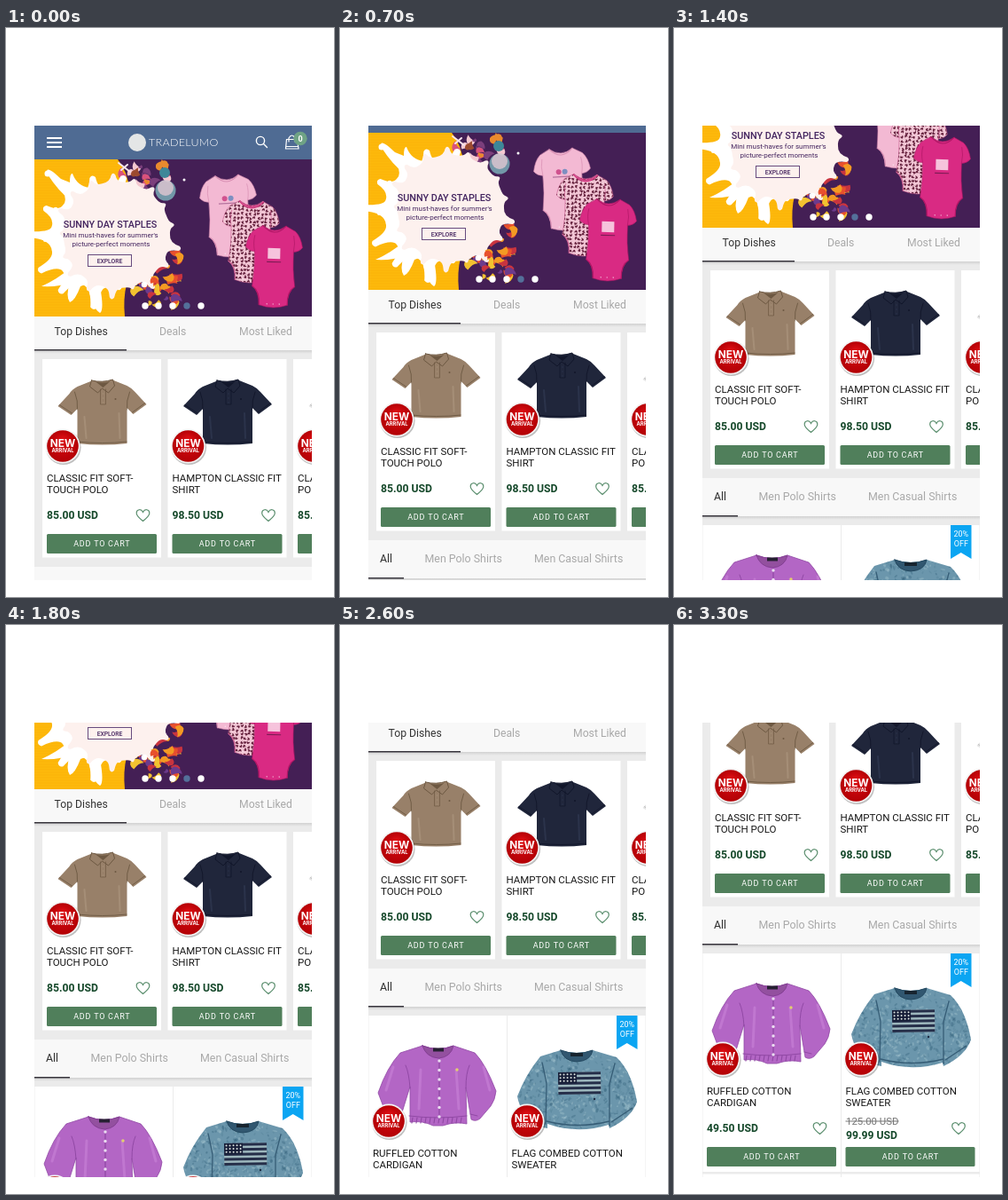
An HTML page with a canvas for the animation above (3.8 s loop, 370x641 px).

```html
<!DOCTYPE html>
<html lang="en">
<head>
<meta charset="utf-8">
<title>Shop app scroll</title>
<style>
html, body { margin: 0; width: 100%; height: 100%; overflow: hidden; background: #fff; }
canvas { display: block; width: 370px; height: 641px; }
</style>
</head>
<body>
<canvas id="stage"></canvas>
<script>
const W = 370, H = 641, LOOP = 3800;
const VIEW = { x: 32, y: 110, w: 313, h: 512 };
const PAGE_H = 920;
const dpr = window.devicePixelRatio || 1;
const SANS = 'Roboto, sans-serif';

function setup(cv, h) {
  cv.width = Math.round(W * dpr);
  cv.height = Math.round(h * dpr);
  const ctx = cv.getContext('2d');
  ctx.scale(dpr, dpr);
  return ctx;
}
const stage = document.getElementById('stage');
const out = setup(stage, H);
const page = document.createElement('canvas');
const c = setup(page, PAGE_H);

let seed = 7;
function rnd(a = 0, b = 1) {
  seed = (seed * 16807) % 2147483647;
  return a + (b - a) * seed / 2147483647;
}

// ---- drawing helpers ----
function rect(x, y, w, h, col) { c.fillStyle = col; c.fillRect(x, y, w, h); }
function round(x, y, w, h, r, col) {
  c.fillStyle = col; c.beginPath(); c.roundRect(x, y, w, h, r); c.fill();
}
function dot(x, y, r, col) {
  c.fillStyle = col; c.beginPath(); c.arc(x, y, r, 0, 7); c.fill();
}
function shape(d, fill, stroke, lw = 1) {
  const p = new Path2D(d);
  if (fill) { c.fillStyle = fill; c.fill(p); }
  if (stroke) { c.strokeStyle = stroke; c.lineWidth = lw; c.stroke(p); }
  return p;
}
// y is the middle of the capital letters
function text(s, x, y, size, col, { w = 400, align = 'left', sp = 0, font = SANS } = {}) {
  c.font = `${w} ${size}px ${font}`;
  c.letterSpacing = sp + 'px';
  c.textAlign = align;
  c.fillStyle = col;
  c.fillText(s, x, y + size * 0.355);
  c.letterSpacing = '0px';
}
function at(x, y, fn, rot = 0, sc = 1) {
  c.save(); c.translate(x, y); c.rotate(rot); c.scale(sc, sc); fn(); c.restore();
}
function shade(y) {
  const g = c.createLinearGradient(0, y, 0, y + 4);
  g.addColorStop(0, 'rgba(0,0,0,.11)');
  g.addColorStop(1, 'rgba(0,0,0,0)');
  rect(32, y, 313, 4, g);
}

// ---- header ----
function header() {
  rect(32, 110, 313, 38, '#4f6b93');
  for (const y of [123, 128, 133]) rect(46, y, 17, 2, '#fff');
  dot(148, 129, 10, '#e4e6e6');
  text('TRADELUMO', 161, 129, 12.5, '#fff', { w: 300, font: 'Lato, sans-serif', sp: 0.3 });
  c.strokeStyle = '#fff'; c.lineWidth = 1.4; c.lineCap = 'round';
  c.beginPath(); c.arc(287, 127, 4.6, 0, 7);
  c.moveTo(290.5, 130.5); c.lineTo(294.5, 134.5); c.stroke();
  shape('M316.5 125.5H328.500L330 136H315.500Z M316 133.500H329.500', null, '#fff', 1.2);
  shape('M319 128V124Q322.500 118 326 124V128', null, '#fff', 1.2);
  dot(332, 124.500, 7.700, '#6fa385');
  text('0', 332, 124.500, 9, '#fff', { w: 700, align: 'center' });
}

// ---- banner ----
function splat(x, y, r, n, spike, col) {
  c.fillStyle = col; c.beginPath();
  const pt = (a, q) => [x + Math.cos(a) * q, y + Math.sin(a) * q];
  const step = Math.PI * 2 / n;
  c.moveTo(...pt(0, r));
  for (let i = 0; i < n; i++) {
    const a = (i + rnd(-0.12, 0.12)) * step, q = r + rnd(0.1, 1) * spike;
    c.quadraticCurveTo(...pt(a + step * 0.32, r), ...pt(a + step * 0.4, q));
    c.quadraticCurveTo(...pt(a + step * 0.5, q + 4), ...pt(a + step * 0.6, q));
    c.quadraticCurveTo(...pt(a + step * 0.66, r), ...pt((i + 1) * step, r));
  }
  c.fill();
}
function confetti(n, x0, x1, y0, y1, cols, big = 6) {
  for (let i = 0; i < n; i++) {
    const s = rnd(2, big), col = cols[i % cols.length];
    at(rnd(x0, x1), rnd(y0, y1), () =>
      shape('M0 -1Q1.300 -.8 1 .3Q.2 1.200 -1 .7Q-.2 .3 0 -1Z', col), rnd(0, 6), s);
  }
}

const SUIT = 'M-13 1Q0 11 13 1L24 7Q30 13 32 25Q28 30 22 30Q21 50 24 69Q16 75 16 90Q0 96 -16 90' +
  'Q-16 75 -24 69Q-21 50 -22 30Q-28 30 -32 25Q-30 13 -24 7Z';
function suit(x, y, rot, col, edge, detail) {
  at(x, y, () => {
    const p = shape(SUIT, col, edge, 0.6);
    c.save(); c.clip(p); detail(); c.restore();
    shape('M-13 1Q0 15 13 1M-24 69Q-15 75 -16 90M24 69Q15 75 16 90', null, edge, 1.1);
    shape('M-22 30Q-24 20 -22 12M22 30Q24 20 22 12', null, edge, 0.7);
    for (const b of [-7, 0, 7]) dot(b, 89, 0.8, '#fff8');
  }, rot);
}

function banner() {
  c.save();
  c.beginPath(); c.rect(32, 148, 313, 177); c.clip();
  rect(32, 148, 313, 177, '#fdb90b');
  c.strokeStyle = 'rgba(240,150,0,.25)'; c.lineWidth = 0.7;
  for (let y = 150; y < 326; y += 3) {
    c.beginPath(); c.moveTo(32, y); c.lineTo(150, y); c.stroke();
  }
  shape('M126 148Q137 161 140 185L150 260Q130 285 134 325H345V148Z', '#441f55');
  confetti(22, 128, 186, 151, 186, ['#e98a2e', '#7b3f7c', '#d9527c', '#f4c8d0', '#9c4a2f']);
  confetti(40, 146, 196, 250, 311, ['#e8502d', '#f39a23', '#c9343f', '#6c3b8c', '#f2c230'], 7);
  dot(179, 163, 6, '#3e8798');
  dot(180, 183, 11.5, 'rgba(126,181,189,.8)');
  dot(180, 180, 9, 'rgba(240,205,215,.7)');
  shape('M127 152L140 162M130 160L137 154', null, '#f7e6ee', 2);
  // drips over the yellow side
  splat(106, 237, 56, 13, 24, '#fff');
  shape('M62 170Q43 152 47 165Q60 185 72 193L79 211L94 180Q80 178 75 164Q72 163 72 174Z', '#fff');
  shape('M73 270Q58 283 40 291Q60 292 72 287Q67 302 72 309Q78 307 84 291L92 288Q97 316 106 321Q111 318 106 291Z', '#fff');
  splat(125, 233, 60, 17, 12, '#fdf1ee');
  dot(47, 164, 3.5, '#fff');
  dot(44, 239, 2, '#fff');
  dot(56, 204, 2.3, '#fff');
  confetti(9, 164, 192, 275, 307, ['#e8502d', '#f39a23', '#c9343f']);
  dot(156, 289, 3.3, '#fff');
  dot(201, 171, 1.5, '#fff');

  const ink = '#43245f';
  text('SUNNY DAY STAPLES', 117.5, 221.5, 10.8, ink, { w: 500, align: 'center' });
  text("Mini must-haves for summer's", 118, 233.5, 8, ink, { align: 'center' });
  text('picture-perfect moments', 118.500, 243.500, 8, ink, { align: 'center' });
  c.strokeStyle = '#674b7e'; c.lineWidth = 1;
  c.strokeRect(92.5, 255.5, 49, 13);
  text('EXPLORE', 117, 262.3, 6.8, ink, { w: 500, align: 'center' });

  suit(249, 165, -0.06, '#f3b9d3', '#d98fb3', () => {
    dot(-4, 27, 3, '#d0538f'); dot(3, 27, 3, '#7d8fc1');
    rect(-11, 32, 22, 1.2, '#b5739e');
  });
  suit(277, 194, 0.03, '#f2c6d5', '#cc5f92', () => {
    for (let y = 2; y < 95; y += 4.5)
      for (let x = -32; x < 33; x += 4.5)
        at(x + rnd(-1, 1), y + rnd(-1, 1), () =>
          shape('M-1.800 -1Q0 -2.500 2 0Q1 2 -1 1.700Q.5 0 -1.800 -1Z', '#67233f'), rnd(0, 6));
    shape('M-13 1Q0 15 13 1', null, '#d52a7a', 3);
  });
  suit(303, 222, 0.02, '#d92a83', '#b01765', () => {
    rect(-7, 26, 14, 12, '#f6c3dc');
    rect(-8, 41, 16, 1.2, '#7e1c55');
  });
  [157, 172, 188, 204, 220].forEach((x, i) => dot(x, 313, 3.7, i === 3 ? '#54709a' : '#fff'));
  c.restore();
}

// ---- product pieces ----
function polo(x, y, col, dark, light) {
  at(x, y, () => {
    const p = shape('M-13 2L-28 8Q-34 11 -37 16L-50 30L-35 40L-28 33L-28 72Q0 75 28 72L28 32L35 39L50 28' +
      'L37 14Q34 10 28 7L13 1Q0 5 -13 2Z', col);
    c.save(); c.clip(p);
    shape('M-28 34Q-27 24 -31 14M28 34Q27 24 31 14M-49 28L-34 38M49 26L34 37M-28 70Q0 73 28 70', null, dark, 0.9);
    shape('M-20 42L-18 66M19 38L20 66', null, light, 2);
    c.restore();
    shape('M-12 1L-14 8L-5 15L0 10L7 15L14 7L12 0Q0 4 -12 1Z', col, dark, 1);
    shape('M-8 2Q0 5 9 2L1 9Z', dark);
    shape('M-2 11L-2 28L4 28L4 11', null, dark, 0.7);
    for (const b of [16, 21, 26]) dot(1, b, 0.8, light);
    dot(15, 22, 1, dark);
  });
}

function cardigan() {
  const edge = '#9149a5';
  shape('M93 694L68 702Q53 718 43 747L54 776L66 782L79 740L79 780Q93 778 105 784L116 784Q130 779 143 782' +
    'L142 741L148 777Q153 780 158 776L170 762Q175 755 176 745Q164 714 152 702L128 694Q111 701 93 694Z', '#b366c5', edge, 0.8);
  shape('M79 742Q78 725 74 716M142 741Q142 725 146 716M78 773Q111 777 143 773M55 766L67 776M147 771L155 773', null, edge, 1);
  for (let x = 82; x < 142; x += 5) shape(`M${x} 775L${x - 1} 781`, null, edge, 1.2);
  shape('M60 718L52 744M162 718L169 744M91 721L89 765M131 721L134 765', null, 'rgba(220,160,232,.3)', 3);
  shape('M93 694Q111 701 128 694Q125 707 111 708Q97 707 93 694Z', '#93509f', '#843f94', 1);
  round(105, 696.500, 12, 4, 0, '#262032');
  shape('M112 708V776', null, edge, 1.3);
  for (let y = 711; y < 778; y += 10.5) dot(112, y, 1.7, '#eadcf0');
  dot(132, 721, 1.700, '#e3cf6d');
}

function sweater() {
  const p = shape('M249 699L226 706Q209 727 200 751Q204 773 224 785L234 787L234 782Q268 794 303 783L304 787' +
    'Q329 775 335 757Q329 723 312 707L285 699Q267 705 249 699Z', '#6b96ac');
  c.save(); c.clip(p);
  for (let i = 0; i < 700; i++) {
    const col = ['rgba(40,88,114,.3)', 'rgba(178,208,216,.3)', 'rgba(86,131,153,.4)'][i % 3];
    at(rnd(198, 337), rnd(697, 791), () => {
      c.fillStyle = col; c.beginPath(); c.ellipse(0, 0, rnd(0.8, 3), rnd(0.6, 1.8), 0, 0, 7); c.fill();
    }, rnd(0, 3));
  }
  shape('M232 782L233 737Q230 721 228 713M304 784L304 737Q308 722 310 714M233 779Q268 788 304 779M208 768L229 780M306 780L330 764',
    null, '#365d76', 1.3);
  c.restore();
  shape('M249 699Q267 706 285 699Q283 711 267 712Q252 711 249 699Z', '#315770', '#244960', 1);
  round(260, 702, 14, 4, 0, '#17242f');
  at(246, 724, () => {
    rect(0, 0, 48, 25, '#9db7bd');
    for (let y = 0; y < 25; y += 5.5) rect(0, y, 48, 3, '#252e49');
    rect(0, 0, 21, 12.500, '#171e38');
    for (let i = 0; i < 15; i++) dot(2.500 + (i % 5) * 4, 2.500 + Math.floor(i / 5) * 3.700, 1, '#dce3e0');
  }, -0.015);
  dot(287, 754, 1.2, '#1d2b42');
}

function badge(x, y) {
  dot(x + 0.8, y + 1.300, 19.8, 'rgba(0,0,0,.25)');
  dot(x, y, 19.5, '#f4f4f4');
  const g = c.createRadialGradient(x, y - 8, 2, x, y, 18);
  g.addColorStop(0, '#d80d12');
  g.addColorStop(1, '#b30005');
  dot(x, y, 17.8, g);
  const font = 'Inter, sans-serif';
  text('NEW', x, y - 3, 11.8, '#fff', { w: 700, align: 'center', font });
  text('ARRIVAL', x, y + 5, 5.8, '#fff', { w: 700, align: 'center', font });
}
function heart(x, y) {
  at(x, y, () => shape('M0 6.500C-4 3 -7.300 .5 -7.300 -2.600C-7.300 -6.800 -2 -7.800 0 -3.600' +
    'C2 -7.800 7.300 -6.800 7.300 -2.600C7.300 .5 4 3 0 6.500Z', null, '#5d9070', 1.2));
}
function button(x, y, w) {
  round(x, y, w, 22, 1.5, '#507f5b');
  text('ADD TO CART', x + w / 2 + 0.3, y + 11, 9, '#fff', { align: 'center', sp: 0.75 });
}
function title(lines, x, y) {
  lines.forEach((s, i) => text(s, x, y + i * 13, 11.5, '#161616'));
}
function price(s, x, y) { text(s, x, y, 12.2, '#15482a', { w: 700 }); }

function tabs(y, h, items, lineW) {
  rect(32, y, 313, h, '#f8f8f8');
  shade(y + h);
  rect(32, y + h - 1, lineW, 1.500, '#37343c');
  items.forEach(([s, x, size], i) => text(s, x, y + (h < 40 ? 17 : 21), size, i ? '#a8a8a8' : '#333'));
}

function topCard(i, lines, cost, cols) {
  const x = 41 + i * 141.5;
  rect(x, 373, 134, 223.5, '#fff');
  polo(x + 67.5, 396, ...cols);
  badge(x + 23, 471);
  title(lines, x + 5, 507);
  price(cost, x + 5, 548.5);
  heart(x + 113.5, 549);
  button(x + 5, 570, 124);
}
function lowCard(x, lines) {
  rect(x, 660, 155.500, 246, '#fff');
  title(lines, x + 4.5, 815);
  heart(x + 132, 857);
  button(x + 4.5, 878, 146);
}

function drawPage() {
  c.save();
  c.beginPath(); c.rect(32, 110, 313, PAGE_H - 110); c.clip();
  rect(32, 110, 313, PAGE_H, '#ebebeb');
  header();
  banner();
  tabs(325, 38, [['Top Dishes', 54.500, 12.2], ['Deals', 173, 12.2], ['Most Liked', 263, 12.2]], 104);
  topCard(0, ['CLASSIC FIT SOFT-', 'TOUCH POLO'], '85.00 USD', ['#988069', '#6d5842', '#a58e77']);
  topCard(1, ['HAMPTON CLASSIC FIT', 'SHIRT'], '98.50 USD', ['#20263b', '#11162a', '#2b334b']);
  topCard(2, ['CLASSIC FIT', 'POLO'], '85.00 USD', ['#e4e4e4', '#bcbcbc', '#f0f0f0']);
  tabs(607, 43, [['All', 45, 12.4], ['Men Polo Shirts', 95.500, 12.4], ['Men Casual Shirts', 219, 12.4]], 40);

  lowCard(32.500, ['RUFFLED COTTON', 'CARDIGAN']);
  cardigan();
  badge(55, 779);
  price('49.50 USD', 37, 857);

  lowCard(189, ['FLAG COMBED COTTON', 'SWEATER']);
  sweater();
  badge(211, 779);
  text('125.00 USD', 194, 848.5, 11.4, '#777');
  rect(193.5, 848.5, 60, 1, '#777');
  price('99.99 USD', 194, 865);
  shape('M312 660H335.500V698L323.700 691L312 698Z', '#0ba5f2');
  text('20%', 323.800, 669.500, 9, '#fff', { align: 'center' });
  text('OFF', 323.800, 680.500, 9, '#fff', { align: 'center' });
  rect(32.500, 908.500, 155.500, 12, '#fff');
  rect(189, 908.500, 155.500, 12, '#fff');
  c.restore();
}

// ---- scroll: 10 px every 100 ms, 29 steps ----
const scrollAt = t => 10 * Math.max(0, Math.min(29, Math.floor((t - 500) / 100) + 1));

let shown = -1;
const start = performance.now();
function tick() {
  const off = scrollAt((performance.now() - start) % LOOP);
  if (off !== shown) {
    shown = off;
    const { x, y, w, h } = VIEW;
    out.fillStyle = '#fff';
    out.fillRect(0, 0, W, H);
    out.drawImage(page, x * dpr, (y + off) * dpr, w * dpr, h * dpr, x, y, w, h);
  }
  requestAnimationFrame(tick);
}
drawPage();
tick();
</script>
</body>
</html>
```
